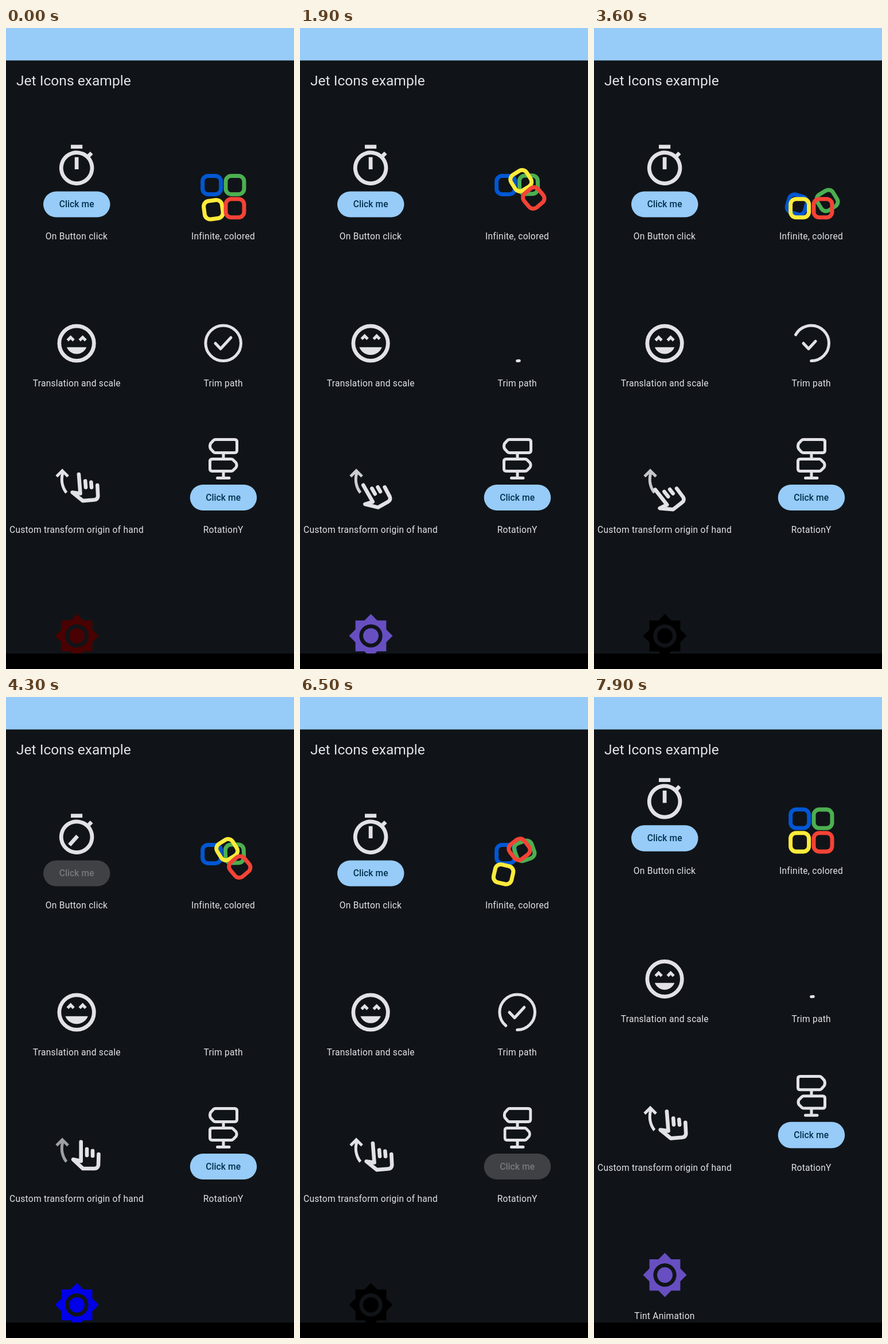
An HTML page that plays this animation: 502x1116 px, repeating every 8000 ms.

```html
<!DOCTYPE html>
<html lang="en">
<head>
<meta charset="utf-8">
<style>
  html, body { margin: 0; height: 100%; overflow: hidden; background: #101418; }
  svg { display: block; width: 502px; height: 1116px; font: 15.6px Roboto, sans-serif; }
  .label { fill: #e1e2e6; letter-spacing: .25px; text-anchor: middle; }
  .button text { font-weight: 500; letter-spacing: .1px; text-anchor: middle; fill: #00314f; }
  .button rect { fill: #97cbf8; }
  .off text { fill: #77797c; }
  .off rect { fill: #3f4145; }
  .solid { fill: #e2e2e6; }
  .line { fill: none; stroke: #e2e2e6; stroke-width: 5; stroke-linecap: round; stroke-linejoin: round; }
</style>
</head>
<body>
<svg viewBox="0 0 502 1116">
  <g id="content">
    <g class="solid" transform="translate(82.8 200) scale(3.36)">
      <path id="crown" d="M9 1h6v2H9z"/>
      <path fill-rule="evenodd" d="M19.03 7.39l1.42-1.42c-.43-.51-.9-.99-1.41-1.41l-1.42 1.42A9 9 0 1 0 19.03 7.39zM12 20a7 7 0 1 1 0-14 7 7 0 0 1 0 14z"/>
      <path id="needle" d="M11 7.4h2v6.3h-2z"/>
    </g>
    <g class="button" id="timerButton">
      <rect x="65" y="284.5" width="116.5" height="45" rx="22.5"/>
      <text x="123.2" y="312.3">Click me</text>
    </g>

    <g id="tiles" fill="none" stroke-width="7"></g>

    <g class="solid" transform="translate(82.8 508.7) scale(3.36)">
      <circle cx="12" cy="12" r="9" fill="none" stroke="#e2e2e6" stroke-width="2"/>
      <path id="eyes" d="M13 9.94L14.06 11l1.06-1.06L16.18 11l1.06-1.06-2.12-2.12zM8.88 9.94L9.94 11 11 9.94 8.88 7.82 6.76 9.94 7.82 11z"/>
      <path id="mouth" d="M12 17.5c2.33 0 4.31-1.46 5.11-3.5H6.89c.8 2.04 2.78 3.5 5.11 3.5z"/>
    </g>

    <g class="line">
      <path id="ring" pathLength="1" d="M378.7 579.5a30.8 30.8 0 0 0 0-61.6 30.8 30.8 0 0 0 0 61.6"/>
      <path id="check" pathLength="1" d="M365 549l9 9.5 18-19.5"/>
    </g>

    <path id="arrow" class="solid" transform="translate(83 763.8) scale(3.36)"
      d="M2.06 5.56L1 4.5 4.5 1 8 4.5 6.94 5.56 5.32 3.94C5.11 4.76 5 5.62 5 6.5c0 2.42.82 4.65 2.2 6.43L6.13 14C4.49 11.95 3.5 9.34 3.5 6.5c0-.92.1-1.82.3-2.68z"/>
    <path id="hand" class="line" style="stroke-width:6.6"
      d="M130.7 774.5V808L117 805 134 821H154q6 0 7-6l.5-19M141 787v11M151 790v9"/>

    <g class="line">
      <path id="leftSign" d="M365 716.5H398.500q4 0 4 4V735.500q0 4-4 4H365q-2 0-3.500-1.500l-5-5.500q-2-4.500 0-9l5-5.500q1.500-1.500 3.500-1.500z"/>
      <path id="rightSign" d="M392.500 750.500H359.500q-4 0-4 4V767.500q0 4 4 4H392.500q2 0 3.500-1.500l5-5q2-4 0-8l-5-5q-1.500-1.500-3.500-1.500z"/>
      <path d="M379 741v8M379 773v9M368.500 783.500h20.500"/>
    </g>
    <g class="button" id="signButton">
      <rect x="320.7" y="795" width="116.500" height="45" rx="22.5"/>
      <text x="378.7" y="822.6">Click me</text>
    </g>

    <g id="sun" transform="translate(83.2 1018) scale(3.36)">
      <path fill-rule="evenodd" d="M20 15.31L23.31 12 20 8.69V4h-4.69L12 .69 8.69 4H4v4.690L.69 12 4 15.31V20h4.69L12 23.31 15.31 20H20zM12 18a6 6 0 1 1 0-12 6 6 0 0 1 0 12z"/>
      <circle cx="12" cy="12" r="4"/>
    </g>

    <g class="label">
      <text x="123" y="368.3">On Button click</text>
      <text x="378.500" y="368.3">Infinite, colored</text>
      <text x="123.300" y="623.600">Translation and scale</text>
      <text x="378.700" y="623.600">Trim path</text>
      <text x="123" y="878.800">Custom transform origin of hand</text>
      <text x="378.700" y="878.800">RotationY</text>
      <text x="123" y="1134">Tint Animation</text>
    </g>
  </g>
  <rect width="502" height="56.500" fill="#97cbf8"/>
  <text x="18" y="100.300" font-size="24.600" fill="#e1e2e6">Jet Icons example</text>
  <rect y="1089" width="502" height="27"/>
</svg>
<script>
const LOOP = 8000;
const $ = id => document.getElementById(id);
const mod = (a, n) => ((a % n) + n) % n;
const clamp = x => Math.min(1, Math.max(0, x));
const move = (id, transform) => $(id).setAttribute('transform', transform);

// cubic-bezier(.4, 0, .2, 1)
function ease(x) {
  x = clamp(x);
  let lo = 0, hi = 1;
  for (let i = 0; i < 18; i++) {
    const s = (lo + hi) / 2, r = 1 - s;
    if (1.2 * s * r * r + .6 * s * s * r + s * s * s < x) lo = s; else hi = s;
  }
  return lo * lo * (3 - 2 * lo);
}

const span = (t, start, length) => ease((t - start) / length);

// Smooth interpolation through [time, value] pairs
function track(t, keys) {
  let value = keys[0][1];
  for (let i = 1; i < keys.length; i++) {
    const [t0, v0] = keys[i - 1], [t1, v1] = keys[i];
    const u = clamp((t - t0) / (t1 - t0));
    value += (v1 - v0) * u * u * (3 - 2 * u);
  }
  return value;
}

// x and y sign, colour, turn order
const tiles = [
  [-1, -1, '#0057d3', 0], [1, -1, '#4caf50', 1],
  [-1, 1, '#ffeb3b', 3], [1, 1, '#f44336', 2]
].map(([sx, sy, color, order]) => {
  const el = document.createElementNS('http://www.w3.org/2000/svg', 'rect');
  const attrs = { x: 378.8 + sx * 20.2 - 16, y: 293.6 + sy * 20.2 - 16, width: 32, height: 32, rx: 9.5, stroke: color };
  for (const name in attrs) el.setAttribute(name, attrs[name]);
  $('tiles').append(el);
  return { el, order };
});

function trim(id, amount) {
  $(id).style.visibility = amount > .0005 ? 'visible' : 'hidden';
  $(id).setAttribute('stroke-dasharray', `${amount} 2`);
}

function flip(id, turn) {
  move(id, `translate(379 0) scale(${Math.cos(Math.PI * turn)} 1) translate(-379 0)`);
}

function drawTimer(t) {
  move('crown', `translate(0 ${track(t, [[3700, 0], [3850, 1], [4100, 0]])})`);
  move('needle', `rotate(${360 * span(t, 3900, 1000)} 12 13)`);
  $('timerButton').classList.toggle('off', t >= 3750 && t < 4950);
}

function drawTiles(t) {
  const p = mod(t - 685, 2400);
  for (const { el, order } of tiles)
    el.setAttribute('transform', `rotate(${360 * span(p, 300 * order, 1000)} 378.8 293.6)`);
}

function drawFace(t) {
  const pulse = track(mod(t, 2400), [[1620, 0], [1900, 1], [2250, 0]]);
  move('eyes', `translate(0 ${-.7 * pulse})`);
  move('mouth', `translate(12 14) scale(${1 + .15 * pulse}) translate(-12 -14)`);
}

function drawTrim(t) {
  const p = mod(t - 1315, 3000);
  trim('ring', span(p, 500, 1000) - span(p, 2000, 1000));
  trim('check', span(p, 870, 630) - span(p, 2080, 850));
}

function drawHand(t) {
  const p = mod(t - 100, 1600);
  const angle = track(p, [[0, -4.5], [300, -38], [400, -39], [950, 0], [1100, 0], [1400, -4.5]]);
  move('hand', `rotate(${angle} 161 824)`);
  $('arrow').style.opacity = track(p, [[0, 1], [300, .87], [650, .5], [950, .6], [1000, .68], [1150, .94], [1300, 1]]);
}

function drawSigns(t) {
  flip('rightSign', span(t, 6310, 1000));
  flip('leftSign', span(t, 6340, 1000));
  $('signButton').classList.toggle('off', t >= 6350 && t < 7340);
}

function drawSun(t) {
  const colors = ['#000', '#00f', '#ff1412'];
  const p = mod(t - 610, 3000) / 1000, i = Math.floor(p);
  $('sun').style.fill =
    `color-mix(in oklab, ${colors[(i + 1) % 3]} ${(100 * ease(p - i)).toFixed(3)}%, ${colors[i]})`;
}

function drawScroll(t) {
  const s = track(t, [[7400, 0], [7860, 1]]);
  move('content', `translate(0 ${-64.6 * s}) scale(1 ${1 + .0119 * s})`);
}

const parts = [drawTimer, drawTiles, drawFace, drawTrim, drawHand, drawSigns, drawSun, drawScroll];
const start = performance.now();

function frame() {
  const t = (performance.now() - start) % LOOP;
  parts.forEach(draw => draw(t));
  requestAnimationFrame(frame);
}
frame();
</script>
</body>
</html>
```
